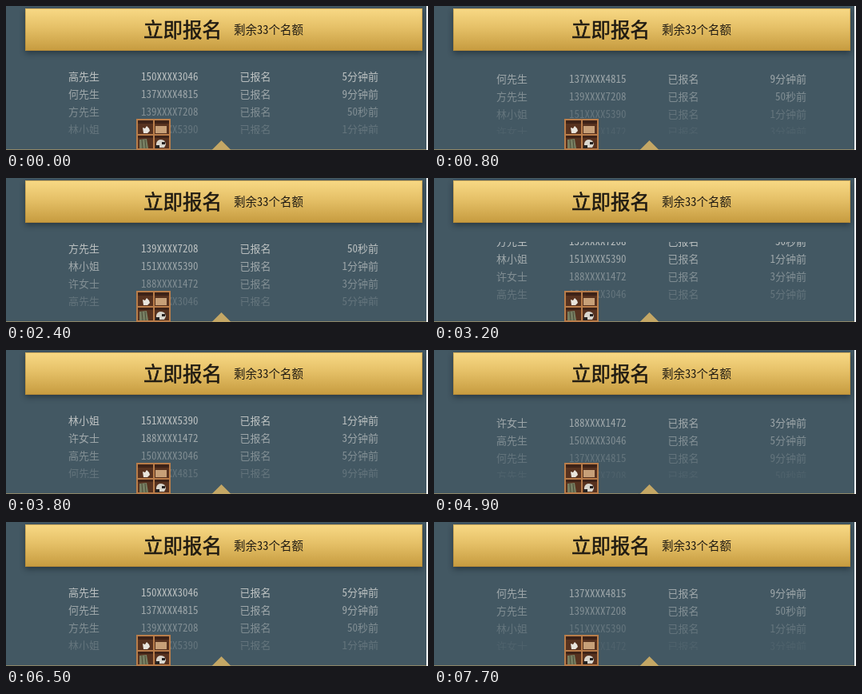
Recreate the animation shown at these times as an HTML page. Size 528x180 px, loop 7.8 s.

```html
<!DOCTYPE html>
<html lang="zh-CN">
<head>
<meta charset="utf-8">
<title>立即报名</title>
<style>
  html, body { margin: 0; width: 100%; height: 100%; overflow: hidden; background: #435863; }
  #stage {
    position: relative; width: 528px; height: 180px; overflow: hidden;
    font-family: "Noto Sans Mono CJK SC", "Noto Sans CJK SC", "Noto Sans CJK", monospace;
  }
  #stage > * { position: absolute; }
  .button {
    left: 24px; top: 3px; width: 497px; height: 53px;
    background: linear-gradient(#f8d985, #e5c067 45%, #c69b3f);
    box-shadow: inset 0 0 0 1px rgba(160, 115, 40, .4), 0 3px 7px rgba(10, 20, 28, .45);
    color: #1f1a12; white-space: nowrap;
  }
  .button b, .button span { position: absolute; top: 0; line-height: 52px; }
  .button b {
    left: 148px; font-size: 24.5px; font-weight: 400;
    font-family: "Noto Sans CJK SC", "Noto Sans CJK", sans-serif;
    -webkit-text-stroke: .6px #1f1a12;
  }
  .button span { left: 261px; font-size: 14.5px; }
  .window { left: 0; top: 80px; width: 528px; height: 80px; overflow: hidden; }
  #list { margin: -3px 0 0; padding: 0; list-style: none; }
  #list li {
    position: relative; height: 22px; line-height: 22px;
    font-size: 13px; color: #cbcecd; white-space: nowrap;
  }
  #list span { position: absolute; top: 0; }
  #list span:nth-child(1) { left: 78px; }
  #list span:nth-child(2) { left: 169px; }
  #list span:nth-child(3) { left: 292.5px; }
  #list span:nth-child(4) { right: 62px; }
  svg { left: 0; top: 0; }
</style>
</head>
<body>
<div id="stage">
  <div class="button"><b>立即报名</b><span>剩余33个名额</span></div>
  <div class="window"><ul id="list"></ul></div>
  <svg width="528" height="180">
    <path d="M0 179.5H528" stroke="#8f8768"/>
    <path d="M526 0h2v180h-2z" fill="#fff"/>
    <path d="M257.500 180L269.500 168L281.500 180Z" fill="#c4a765"/>
    <!-- bookcase -->
    <rect x="163" y="141" width="43" height="39" fill="#b97d4a"/>
    <path d="M165 143h19v17h-19zM186 143h18v17h-18zM165 162h19v16h-19zM186 162h18v16h-18z" fill="#57321f"/>
    <path d="M165 143h19v4h-19zM186 143h18v4h-18zM165 162h19v3h-19zM186 162h18v3h-18z" fill="#3d2217"/>
    <path d="M171 152l3 1 2-3 3 3 1 3-3 3h-5z" fill="#e9e5dd"/>
    <path d="M187 150h14v9h-14z" fill="#c7a078"/>
    <path d="M167 167l9-1 2 12h-11z" fill="#777f62"/>
    <path d="M170 167l1 11M174 167l1 11" stroke="#4b4c38"/>
    <path d="M188 172q1-5 6-5t6 6l-2 4h-10z" fill="#d9d6ce"/>
    <path d="M187 174h5v4h-5zM195 170h4v3h-4z" fill="#262322"/>
  </svg>
</div>
<script>
  const LOOP = 7800, TICK = 100, ROW = 22, GLIDE = 1000;
  const starts = [4, 1362, 2738, 4103, 5466, 6832];
  const people = [
    ["高先生", "150XXXX3046", "5分钟前"],
    ["何先生", "137XXXX4815", "9分钟前"],
    ["方先生", "139XXXX7208", "50秒前"],
    ["林小姐", "151XXXX5390", "1分钟前"],
    ["许女士", "188XXXX1472", "3分钟前"]
  ];

  const list = document.getElementById("list");
  list.innerHTML = [...people, ...people].map(([name, phone, ago]) =>
    `<li><span>${name}</span><span>${phone}</span><span>已报名</span><span>${ago}</span></li>`
  ).join("");
  const rows = [...list.children];

  const clamp = x => Math.min(1, Math.max(0, x));
  const swing = x => 0.5 - Math.cos(Math.PI * x) / 2;

  // Each glide lifts the list by one row, in whole pixels.
  const offset = t => starts.reduce(
    (sum, s) => sum + Math.floor(ROW * swing(clamp((t - s) / GLIDE))), 0);

  // A row keeps its fade while gliding and takes the next one on arrival.
  const fade = place => clamp(Math.max(0.08, 0.9 - 0.22 * place));

  const origin = performance.now();
  function draw() {
    const t = (performance.now() - origin) % LOOP;
    const y = offset(Math.floor(t / TICK) * TICK);
    const first = Math.floor(y / ROW);
    list.style.transform = `translateY(${-y}px)`;
    rows.forEach((row, i) => row.style.opacity = fade(i - first));
    requestAnimationFrame(draw);
  }
  draw();
</script>
</body>
</html>
```
